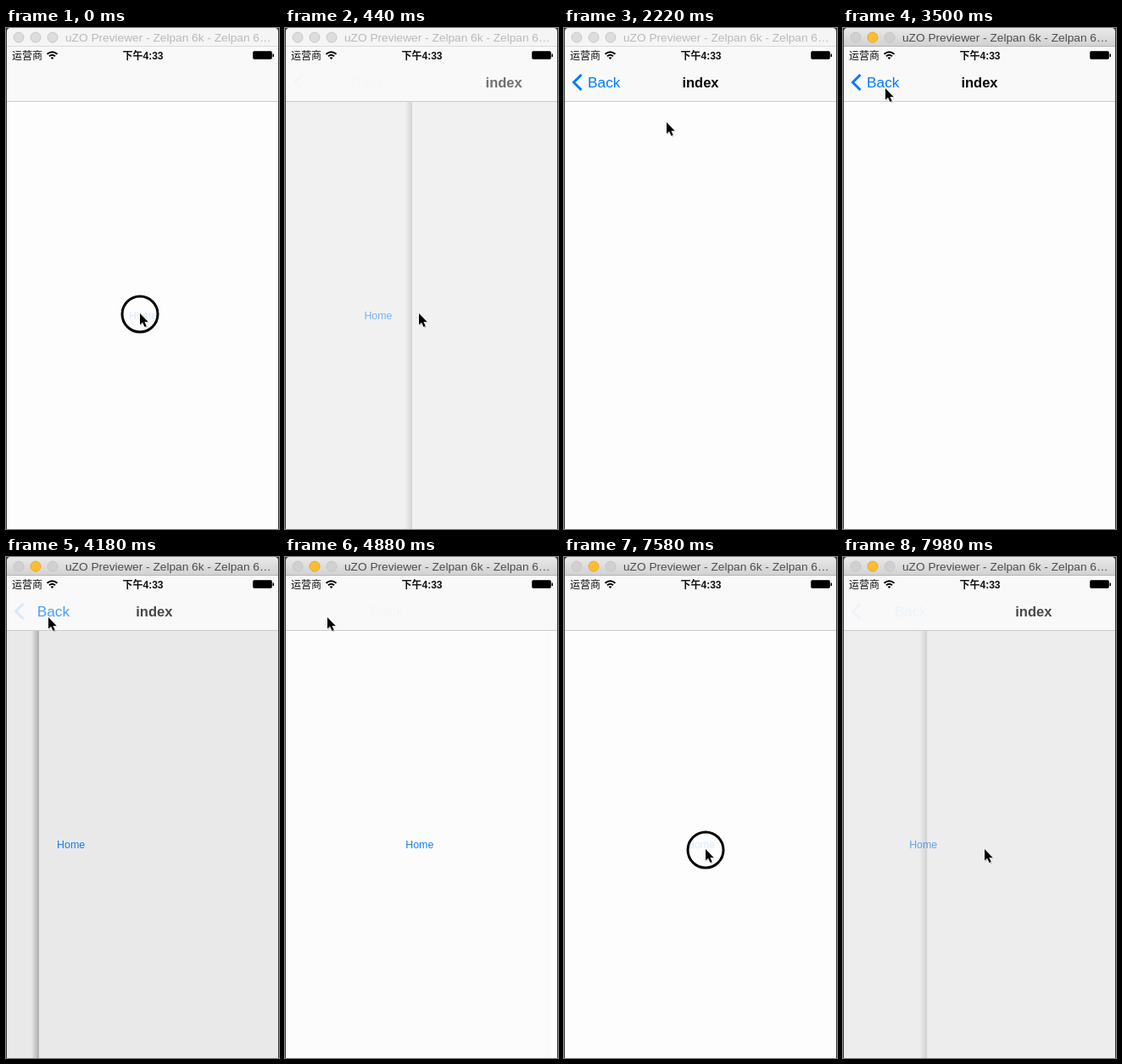
An HTML page for the animation above (8000 ms loop, 322x590 px).

```html
<!DOCTYPE html>
<html lang="zh">
<head>
<meta charset="utf-8">
<style>
  html, body { margin: 0; width: 100%; height: 100%; overflow: hidden; background: #fdfdfe; }
  svg { display: block; font-family: "Liberation Sans", Arial, sans-serif; }
  .cjk { font-family: "Liberation Sans", "Noto Sans CJK SC", "Noto Sans CJK", sans-serif; font-size: 12px; }
</style>
</head>
<body>
<svg width="322" height="590" viewBox="0 0 322 590">
  <defs>
    <linearGradient id="activeFill" x2="0" y2="1">
      <stop stop-color="#e9e9e9"/><stop offset="1" stop-color="#d2d2d2"/>
    </linearGradient>
    <linearGradient id="shadowFill">
      <stop stop-opacity="0"/><stop offset="1"/>
    </linearGradient>
  </defs>

  <rect id="page" width="322" height="590"/>
  <text id="home" x="145" y="343" font-size="12.4" fill="#147ef0">Home</text>
  <rect id="shadow" y="87" width="9" height="503" fill="url(#shadowFill)"/>

  <rect y="22" width="322" height="64" fill="#f9f9f9"/>
  <rect y="86" width="322" height="1" fill="#cbcbcb"/>
  <path id="chevron" d="M20.5 55 L11.5 64 L20.5 73" fill="none" stroke="#007aff" stroke-width="3"/>
  <text id="back" x="28" y="70" font-size="17.3" fill="#007aff">Back</text>
  <text id="title" x="161" y="70" font-size="16.5" font-weight="700" text-anchor="middle" fill="#080808">index</text>

  <g class="cjk" fill="#111">
    <text x="7" y="37">运营商</text>
    <text x="161.5" y="37" text-anchor="middle" font-weight="700">下午4:33</text>
  </g>
  <g fill="none" stroke="#000" stroke-width="2">
    <path d="M48.5 30.8 Q54.5 25.6 60.5 30.8 M51 33.3 Q54.5 30.2 58 33.3"/>
    <path d="M54.5 37 L52.6 34.9 Q54.5 33.4 56.4 34.9 Z" fill="#000" stroke="none"/>
  </g>
  <rect x="291.5" y="27.5" width="22" height="9" rx="1.5" stroke="#333"/>
  <rect x="314.5" y="30.5" width="1.5" height="3.5"/>

  <rect id="bar" width="322" height="21"/>
  <rect id="barLine" y="21" width="322" height="1"/>
  <g id="lights" stroke="#c0c0c0" stroke-width=".8">
    <circle cx="15" cy="11" r="6"/><circle id="amber" cx="35" cy="11" r="6"/><circle cx="55" cy="11" r="6"/>
  </g>
  <text id="caption" x="70" y="16" font-size="13.7">uZO Previewer - Zelpan 6k - Zelpan 6…</text>

  <path d="M0 0H4Q1 1 1 4V590H0Z M322 0H318Q321 1 321 4V590H322Z" fill="#333a36"/>

  <g id="pointer">
    <circle id="ring" cy="1" r="21" fill="none" stroke="#000" stroke-width="3"/>
    <path d="M1 1 V15 L4.2 12 L6.6 17.4 L8.8 16.4 L6.5 11.2 H10.8 Z" fill="#000" opacity=".18"/>
    <path d="M0 0 V13.6 L3.1 10.7 L5.5 16 L7.7 15 L5.4 9.9 H9.6 Z" fill="#000" stroke="#fff" stroke-width="1" paint-order="stroke"/>
  </g>
</svg>
<script>
const LOOP = 8000, SLIDE = 960;
const PUSHES = [180, 7630], POP = 4097, ACTIVATE = 3450;
const PRESSES = [[0, 150], [3850, 4080], [7400, 7600]];
// time, x, y of the pointer tip
const PATH = [[0, 158, 336], [1500, 158, 336], [2220, 121, 111], [2950, 50, 71],
              [5100, 50, 71], [5800, 120, 240], [6300, 170, 361], [6500, 171, 361],
              [7300, 167, 344], [LOOP, 167, 344]];

const $ = id => document.getElementById(id);
const set = (id, attrs) => { for (const k in attrs) $(id).setAttribute(k, attrs[k]); };
const shift = (x, y = 0) => `translate(${x} ${y})`;
const within = (t, start, length) => t >= start && t < start + length;
const mix = (a, b, k) => `rgb(${a.map((v, i) => Math.round(v + (b[i] - v) * k))})`;

// critically damped spring
const spring = ms => { const s = ms * 0.0069; return 1 - (1 + s) * Math.exp(-s); };

function pointerAt(t) {
  const i = PATH.findIndex(p => p[0] > t);
  const [t0, x0, y0] = PATH[i - 1], [t1, x1, y1] = PATH[i];
  const k = (t - t0) / (t1 - t0), e = k * k * (3 - 2 * k);
  return [x0 + (x1 - x0) * e, y0 + (y1 - y0) * e];
}

// depth: 0 on the first screen, 1 on the second
function navigation(t, pressed) {
  const start = PUSHES.find(s => within(t, s, SLIDE));
  if (start !== undefined) {
    const p = spring(t - start), left = 1 - p, fade = ((t - start) / SLIDE) ** 3;
    return { depth: p, dim: p, home: Math.min(1, .2 + (t - start) / 750),
             back: fade, chevron: fade, title: Math.min(1, p * 1.05),
             backX: 108 * left, titleX: 210 * left, shadow: .12 * Math.min(1, left / .3) };
  }
  if (within(t, POP, SLIDE)) {
    const p = spring(t - POP), left = 1 - p;
    return { depth: left, dim: left, home: 1,
             back: .8 * left, chevron: .15 * left, title: left ** 2.5,
             backX: 75 * p, titleX: 120 * p, shadow: .3 * left };
  }
  const second = t > PUSHES[0] && t < POP, shown = second ? (pressed ? .25 : 1) : 0;
  return { depth: +second, dim: 0, home: second ? 0 : pressed ? .15 : 1,
           back: shown, chevron: shown, title: +second, backX: 0, titleX: 0, shadow: 0 };
}

function draw(t) {
  const pressed = PRESSES.some(([a, b]) => t >= a && t < b);
  const n = navigation(t, pressed), active = t >= ACTIVATE;
  set('page', { fill: mix([253, 253, 254], [230, 230, 230], n.dim) });
  set('home', { transform: shift(-96 * n.depth), opacity: n.home });
  set('shadow', { x: 320 * (1 - n.depth) - 7, opacity: n.shadow });
  set('back', { transform: shift(n.backX), opacity: n.back });
  set('chevron', { opacity: n.chevron });
  set('title', { transform: shift(n.titleX), opacity: n.title });
  set('bar', { fill: active ? 'url(#activeFill)' : '#f5f5f5' });
  set('barLine', { fill: active ? '#b4b4b4' : '#dadada' });
  set('lights', { fill: active ? '#d0d0d0' : '#dcdcdc' });
  set('amber', { fill: active ? '#ffbd2e' : '#dcdcdc', stroke: active ? '#dfa023' : '#c0c0c0' });
  set('caption', { fill: active ? '#4d4d4d' : '#b9b9b9' });
  set('pointer', { transform: shift(...pointerAt(t)) });
  set('ring', { opacity: +pressed });
}

const began = performance.now();
function tick() {
  draw((performance.now() - began) % LOOP);
  requestAnimationFrame(tick);
}
tick();
</script>
</body>
</html>
```
